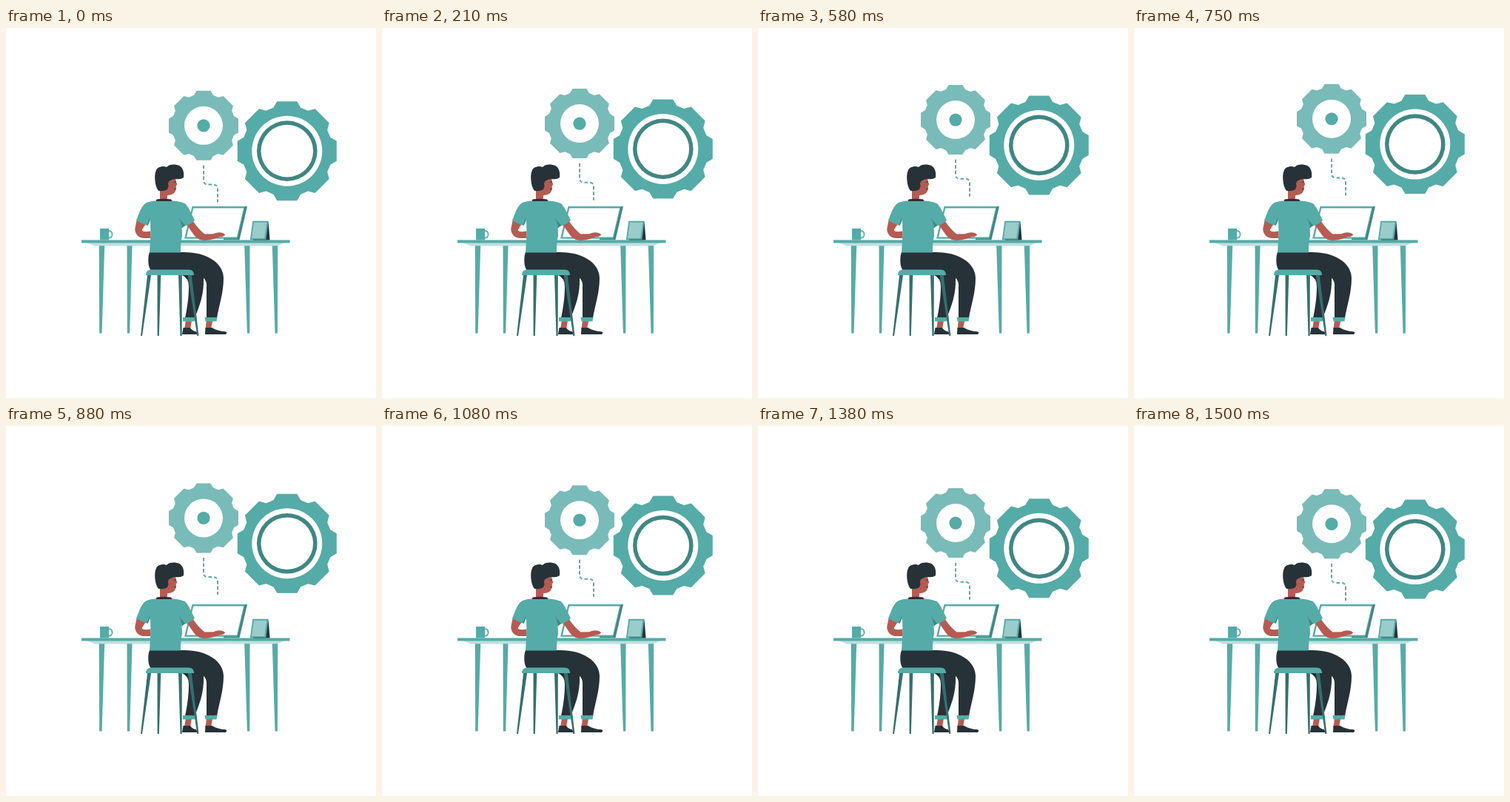
Write an HTML page with a canvas that moves like this. It is 500 px wide and 500 px high and loops after 1540 ms.

```html
<!DOCTYPE html>
<html lang="en">
<head>
<meta charset="utf-8">
<title>Working at a desk</title>
<style>
html, body { margin: 0; width: 100%; height: 100%; overflow: hidden; background: #fff; }
canvas { display: block; width: 500px; height: 500px; }
</style>
</head>
<body>
<canvas id="stage" width="500" height="500"></canvas>
<script>
const ctx = document.getElementById('stage').getContext('2d');
const TEAL = '#55aba7', SOFT = '#79bbb8', DEEP = '#3f8783', STOOL = '#34706d';
const PALE = '#bfe0de', GLASS = '#9accc9', DARK = '#263238', SKIN = '#b55b52', WHITE = '#fff';
const LOOP = 1540, STEP = 1000 / 24;

function shape(color, d) {
  ctx.fillStyle = color;
  ctx.fill(new Path2D(d));
}

function line(color, width, d, dash = []) {
  ctx.strokeStyle = color;
  ctx.lineWidth = width;
  ctx.setLineDash(dash);
  ctx.stroke(new Path2D(d));
  ctx.setLineDash([]);
}

function disc(color, x, y, r) {
  ctx.fillStyle = color;
  ctx.beginPath();
  ctx.arc(x, y, r, 0, Math.PI * 2);
  ctx.fill();
}

// Eight flat teeth; proportions are relative to the outer radius.
function gear(color, x, y, r) {
  const tooth = [[-0.276, -0.873], [-0.201, -1], [0.201, -1], [0.276, -0.873]];
  ctx.fillStyle = color;
  ctx.beginPath();
  for (let i = 0; i < 8; i++) {
    const c = Math.cos(i * Math.PI / 4), s = Math.sin(i * Math.PI / 4);
    for (const [u, v] of tooth) ctx.lineTo(x + r * (u * c - v * s), y + r * (u * s + v * c));
  }
  ctx.fill();
}

function drawGears(dy) {
  ctx.save();
  ctx.translate(0, dy);
  gear(SOFT, 267, 132.3, 47);
  disc(WHITE, 267, 132.3, 26);
  disc(TEAL, 267, 132.3, 8.6);
  gear(TEAL, 379.8, 166.6, 67);
  disc(WHITE, 379.8, 166.6, 47.5);
  disc(DEEP, 379.8, 166.6, 40.8);
  disc(WHITE, 379.8, 166.6, 35.3);
  line(TEAL, 2, 'M267 186V206Q267 212 273 212H280Q286 212 286 218V236', [4.6, 2.9]);
  ctx.restore();
}

function drawDesk() {
  shape(PALE, 'M109 290H376L367 294.5H120Z');
  shape(TEAL, 'M102 286.5H383.5V290.4H102Z');
  shape(TEAL, 'M125.7 294.3H133.2L129.6 412.5H126.2Z M163.5 294.3H170.5L167.2 412.5H163.8Z');
  shape(TEAL, 'M322.2 294.3H329.5L329.3 412.5H325.9Z M359.8 294.3H367.2L366.9 412.5H363.5Z');

  shape(TEAL, 'M127 271H139V286.5H127Z');
  line(TEAL, 1.7, 'M138.5 274.2C145.2 273.2 145.2 284.6 138.5 283.6');

  shape(DEEP, 'M320 241H326L315.5 286.3H294V284H310Z');
  shape(TEAL, 'M251.5 241H323L312.5 284.8H241Z');
  shape(WHITE, 'M253.3 243.5H321.2L312 282.4H244Z');

  shape(DARK, 'M354.5 261.5L356.6 286.5H349Z');
  shape(TEAL, 'M333.3 260.8H354.7L351.2 286.5H329.8Z');
  shape(GLASS, 'M335 262.8H352.3L349.3 284.3H332Z');
  shape(DEEP, 'M334 285.2H351.4L351.2 287H334Z');
}

function drawMan() {
  // shoes, ankles, trousers and cuffs
  shape(SKIN, 'M243 395H251L249 407H241Z M271 395H279.3L277 407H269.5Z');
  shape(DARK, 'M239.5 405H249Q251 409 257 410.3Q259.5 412 258.5 414H238Z');
  shape(DARK, 'M269.5 405H278.5Q285 409.5 297 410.3Q299.5 411.5 297 414H269Z');
  line('#dfe3e4', 1, 'M279 404.5L284 407 M250 404.5L254 407');
  shape(DARK, 'M194 303H238C270 302 294 317 294 338C294 358 288 374 285 392H271V346Q270 340 267 338C268 360 261 377 255 392H242C246 373 247 360 247 349Q247 338 238 334H206Q193 331 192.3 316Q192 308 194 303Z');
  shape(TEAL, 'M239 391H256L254.5 396.5H239Z M268.5 391H285.5L284.5 396.5H269.5Z');

  // arms
  shape(SKIN, 'M177 258L190 263L183.6 273Q185 276.5 195.5 274.5V284H187C178 284 174 277 174.3 271Z');
  shape(SKIN, 'M243 264L252 260Q260 272 268.5 278.5L280 278.3Q286 275.5 291 276.5Q296 278 296 279.5Q294 282.5 288 282.6Q278 287 267 287Q258 286 253.5 279Z');

  // neck and face
  shape(SKIN, 'M208 217H218.5V224L217.5 233H208Z');
  shape(SKIN, 'M216 205L229.3 203.5Q229.5 208 231.4 211.5L229.6 213.5Q230.6 216 229.3 218.5Q228.5 224 222.5 225.6Q215 227 211 222Z');
  shape(DARK, 'M203 214C200 203 200.5 190 207.5 188Q213 186 217 188C220 183.5 229 184 233 185.5C239 188 241 194 240 202Q236 205 230 204Q225 203.5 222.8 206Q219.5 206 219.5 211Q220 217 216.5 219Q211 221 206.5 220Q204.5 219 203 214Z');
  disc(SKIN, 221.5, 210.5, 2.5);
  line(DARK, 1, 'M226.8 208.2H229.8 M227.2 217.8H230');

  // shirt
  shape(TEAL, 'M202.5 233.5H224.5Q236 234 241.5 237C246 240 251 252 255 260Q249 265.5 241 268L237.5 270.5L238.2 280Q235.5 291 236 303.5H194L195.5 278L195 260L191.5 267Q183 264.5 176 260C181 247 183.5 240 189.5 236.2Q194 234 202.5 233.5Z');
  shape(DEEP, 'M231.5 253.5Q235 260 242 266.5L238 270.3Q237 261 231.5 253.5Z M194.8 253Q194.7 260 191.5 266.8L190 266.2Q194 259 194.8 253Z');
  shape(DARK, 'M203.5 231.5Q213 230 223 231.5L224.5 234H202.7Z');
}

function drawStool() {
  shape(STOOL, 'M191.2 333H196.2L184 416H182Z M204.5 333H209.3L206.8 416H204.6Z');
  shape(STOOL, 'M233 333H237.8L237.7 416H235.5Z M245.7 333H250.7L260.5 416H258.3Z');
  shape(TEAL, 'M189 334V332.5Q190 326.5 196 326.5H247Q253 326.5 254 332.5V334Z');
}

// Linear rise of ten pixels, then an equally fast fall to rest.
function lift(t) {
  const turn = 718;
  return Math.min(0, Math.abs(t - turn) / 75 - 10);
}

function render(now) {
  const t = Math.floor((now % LOOP + 5) / STEP) * STEP;
  ctx.fillStyle = WHITE;
  ctx.fillRect(0, 0, 500, 500);
  drawGears(lift(t));
  drawDesk();
  drawMan();
  drawStool();
}

const start = performance.now();
function tick() {
  render(performance.now() - start);
  requestAnimationFrame(tick);
}
tick();
</script>
</body>
</html>
```
